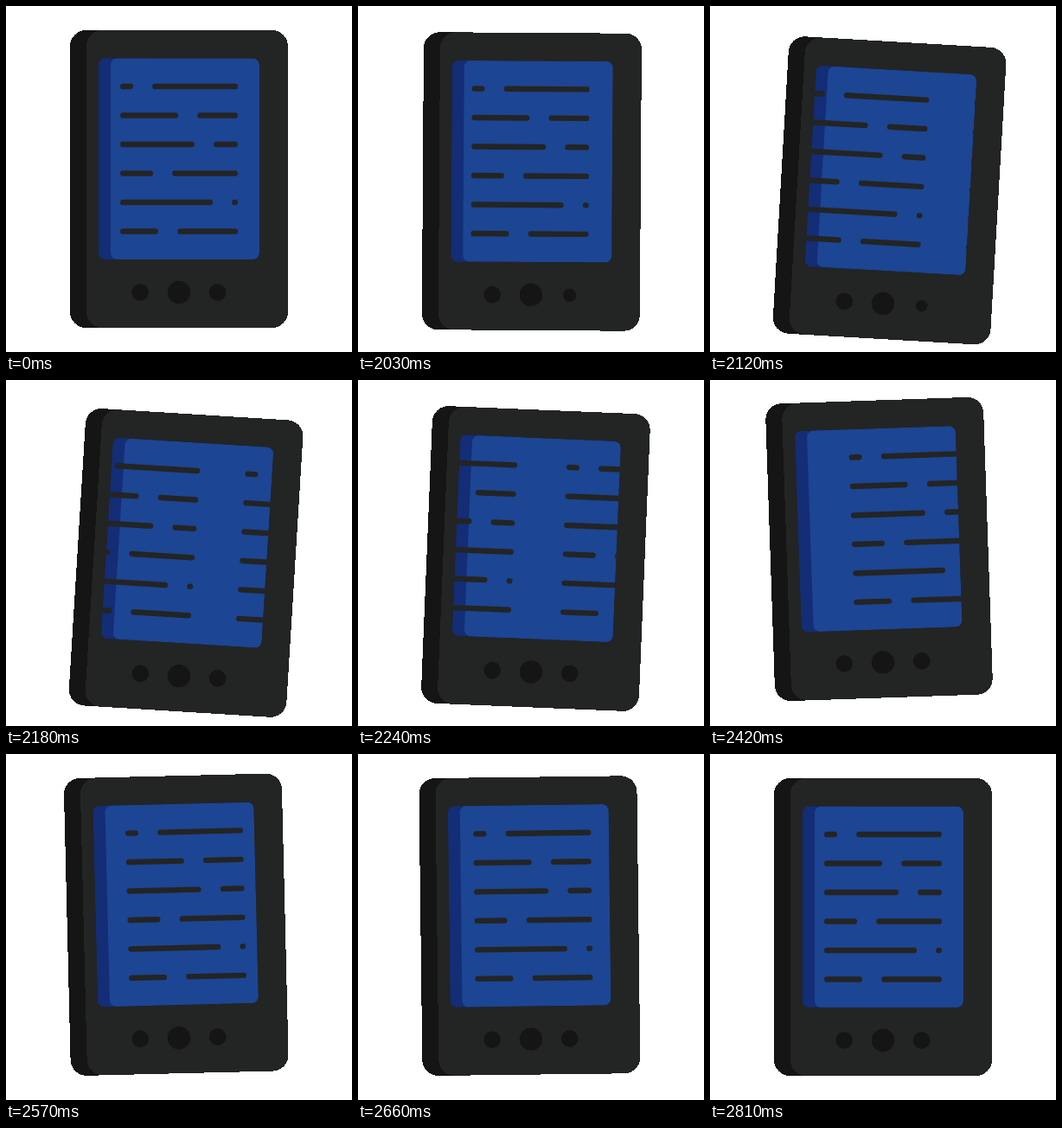
Write an HTML page that moves like this. It is 400 by 400 pixels and loops after 2.84 s.

```html
<!DOCTYPE html>
<html lang="en">
<head>
<meta charset="utf-8">
<title>E-reader page turn</title>
<style>
  html, body { margin: 0; width: 100%; height: 100%; overflow: hidden; background: #fff; }
  svg { display: block; width: 100vw; height: 100vh; }
</style>
</head>
<body>
<svg viewBox="0 0 400 400">
  <defs>
    <clipPath id="screen"><rect x="107" y="60.5" width="186" height="232.5" rx="7.5"/></clipPath>
    <g id="text" stroke="#232424" stroke-width="6.4" stroke-linecap="round"></g>
  </defs>
  <g id="device">
    <g shape-rendering="crispEdges">
      <rect x="74" y="28" width="80" height="344" rx="18.5" fill="#151515"/>
      <rect x="93" y="28" width="233" height="344" rx="18.5" fill="#232424"/>
    </g>
    <g clip-path="url(#screen)">
      <rect x="107" y="60" width="60" height="234" fill="#132d76"/>
      <rect x="121" y="60.5" width="172" height="232.5" rx="7.5" fill="#1c4593"/>
      <use id="oldPage" href="#text"/>
      <use id="newPage" href="#text"/>
    </g>
    <g fill="#151515">
      <circle cx="155.2" cy="331" r="9.8"/>
      <circle cx="200" cy="331" r="13.2"/>
      <circle id="next" cx="244.7" cy="331" r="9.8"/>
    </g>
  </g>
</svg>
<script>
const LOOP = 2840, REST = 2000, STEP = 30, LAST = 27;
const $ = id => document.getElementById(id);

// Every row is one line of text broken by a gap of constant width.
const LEFT = 132, RIGHT = 268, GAP = 22.2, CAP = 3.2;
const dash = (from, to, y) => `M${from + CAP} ${y}H${to - CAP + 0.01}`;
$('text').innerHTML = [147, 199, 218, 170, 239, 176].map((end, row) => {
  const y = 93 + row * 33.5;
  return `<path d="${dash(LEFT, end, y)}${dash(end + GAP, RIGHT, y)}"/>`;
}).join('');

// Same as cubic-bezier(lead, 0, settle, 1).
function ease(u, lead, settle) {
  let low = 0, high = 1;
  for (let i = 0; i < 20; i++) {
    const s = (low + high) / 2, r = 1 - s;
    if (3 * r * r * s * lead + 3 * r * s * s * settle + s ** 3 < u) low = s;
    else high = s;
  }
  return low * low * (3 - 2 * low);
}

// Eases between [step, value] keys and holds the last value.
function track(keys, lead = 1 / 3, settle = 2 / 3) {
  return step => {
    const next = keys.findIndex(([at]) => at > step);
    if (next < 0) return keys[keys.length - 1][1];
    const [a, from] = keys[next - 1], [b, to] = keys[next];
    return from + (to - from) * ease((step - a) / (b - a), lead, settle);
  };
}

const SWING = 14.5;
const tilt = track([[0, 0], [5, 3.72], [SWING, -2], [LAST, 0]]);
const drop = track([[0, 0], [4.5, 13.5], [SWING, -4.7], [LAST, 0]], 0.15);
const leave = track([[0, 0], [18, -225]]);
const enter = track([[0, 186], [LAST, 0]], 0.25, 0.25);
const press = step => 9.8 - 4 * Math.sin(Math.PI * Math.min(1, step / 5.5));

function draw(time) {
  const step = Math.min(LAST, Math.max(0, Math.floor((time % LOOP - REST) / STEP)));
  $('device').setAttribute('transform', `translate(0 ${drop(step)}) rotate(${tilt(step)} 200 331)`);
  $('oldPage').setAttribute('x', leave(step));
  $('newPage').setAttribute('x', enter(step));
  $('next').setAttribute('r', press(step));
}

const begin = performance.now();
function tick() {
  draw(performance.now() - begin);
  requestAnimationFrame(tick);
}
tick();
</script>
</body>
</html>
```
